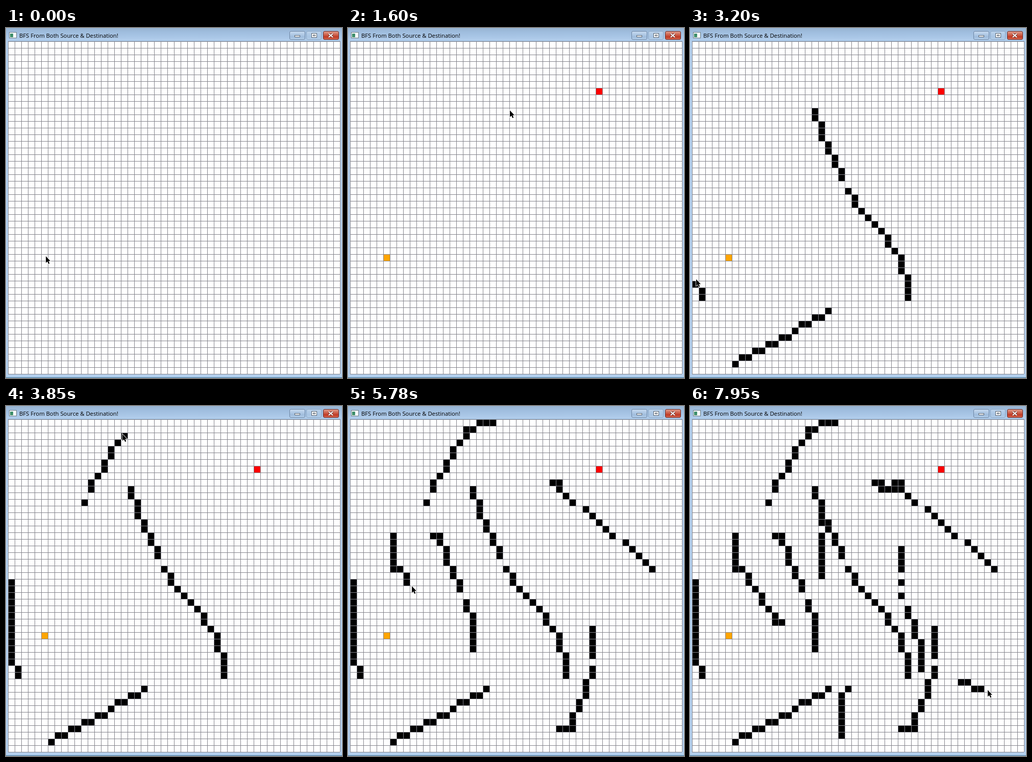
An HTML page with a canvas that plays this animation: 658x684 px, repeating every 7.99 s.

```html
<!DOCTYPE html>
<html lang="en">
<head>
<meta charset="utf-8">
<title>Grid search</title>
<style>
  html, body { margin: 0; width: 100%; height: 100%; overflow: hidden; }
  canvas { display: block; }
</style>
</head>
<body>
<canvas id="stage" width="658" height="684"></canvas>
<script>
const ctx = document.getElementById('stage').getContext('2d');
const LOOP = 7990, CELL = 13, LEFT = 4, TOP = 26, COUNT = 50;
const LIFT = null;

const path = [];   // pointer keys
const cells = [];  // wall cells with the time they turn black

const toX = col => LEFT + (col + 0.5) * CELL;
const toY = row => TOP + (row + 0.5) * CELL;

function moveTo(t, x, y) {
  path.push({ t, x, y });
}

// Walks a polyline in [col, row], one cell per step along its main direction.
function drawWall(t0, t1, ...points) {
  const steps = [];
  let last = LIFT;
  for (const point of points) {
    if (point && last) {
      const dc = point[0] - last[0], dr = point[1] - last[1];
      const w = Math.abs(dc), h = Math.abs(dr);
      const n = Math.max(1, Math.round(w > 1.5 * h ? w : h));
      for (let i = 1; i <= n; i++) steps.push([last[0] + dc * i / n, last[1] + dr * i / n]);
    } else if (point) {
      steps.push(point);
    }
    last = point;
  }
  steps.forEach(([col, row], i) => {
    const t = t0 + (t1 - t0) * i / (steps.length - 1);
    moveTo(t, toX(col), toY(row));
    cells.push({ t, col: Math.round(col), row: Math.round(row) });
  });
}

moveTo(0, 77, 446);
moveTo(740, 77, 446);
moveTo(1240, 491, 124);
moveTo(1470, 491, 124);
moveTo(1593, 316, 161);
drawWall(1690, 2400, [17.7, 10], [22, 20], LIFT, [22.7, 22], [28.65, 29], [31, 32], [32.3, 38]);
drawWall(2550, 2930, [20, 40.22], [6, 47.9]);
drawWall(3120, 3484, [1, 38], [1, 37], [0, 36], [0, 24]);
drawWall(3630, 3960, [11, 12], LIFT, [11.72, 10], [17.1, 1], [18, 1], [19, 0], [21, 0]);
drawWall(4080, 4390, [30, 9], [31, 9], [31.06, 10], [45.25, 22]);
moveTo(4545, 480, 430);
drawWall(4580, 4930, [36, 31], [36, 35], LIFT, [36.2, 37], [32.6, 46], [31, 46]);
drawWall(5080, 5470, [18, 34], [18, 29], [17.2, 28], [16.7, 27], LIFT, [16.2, 25], [12.6, 17], [12, 17]);
drawWall(5570, 5930, [6, 17], [6, 22], [7, 22], [7.8, 23], [12.2, 30], [13, 30]);
drawWall(6080, 6360, [19, 23], [19, 17], LIFT, [19, 15]);
drawWall(6540, 6700, [27, 9], [28, 9], [28, 10], [30, 10]);
moveTo(6718, 399, 169);
drawWall(6860, 7230, [31, 19], [31, 22], LIFT, [31, 24], LIFT, [31, 26], LIFT, [31.7, 28], [33.8, 33], [34, 37]);
drawWall(7390, 7640, [23, 40], [22, 41], [22, 47]);
drawWall(7820, 7920, [40, 39], [41, 39], [42, 40], [43, 40]);
moveTo(7948, 582, 555);
moveTo(LOOP, 594, 558);

function pointerAt(t) {
  const i = Math.max(1, path.findIndex(p => p.t > t));
  const a = path[i - 1], b = path[i], k = (t - a.t) / (b.t - a.t);
  return [a.x + (b.x - a.x) * k, a.y + (b.y - a.y) * k];
}

function rect(color, x, y, w, h) {
  ctx.fillStyle = color;
  ctx.fillRect(x, y, w, h);
}

function shade(x, y, w, h, ...stops) {
  const g = ctx.createLinearGradient(0, y, 0, y + h);
  stops.forEach((c, i) => g.addColorStop(i / (stops.length - 1), c));
  rect(g, x, y, w, h);
}

function button(x, w, edge, ...stops) {
  ctx.beginPath();
  ctx.roundRect(x + 0.5, 6.5, w - 1, 16, 2.5);
  ctx.save();
  ctx.clip();
  shade(x, 6, w, 17, ...stops);
  ctx.restore();
  ctx.strokeStyle = edge;
  ctx.lineWidth = 1;
  ctx.stroke();
}

function drawWindow() {
  rect('#b4d0ee', 0, 0, 658, 684);
  shade(0, 0, 658, 26, '#98b4d2', '#a0bedf', '#a9c6e6', '#b4d0ee');
  rect('#93b2d2', 3, 25, 652, 1);
  rect('#86b8dc', 0, 682, 658, 1);
  rect('#5c7c98', 0, 683, 658, 1);

  rect('#6f7f84', 6, 8, 15, 12);
  rect('#f6f9fb', 7, 9, 13, 10);
  rect('#3f8f6a', 8, 11, 6, 7);

  ctx.fillStyle = '#000';
  ctx.font = '11.25px "Open Sans", "Noto Sans", sans-serif';
  ctx.fillText('BFS From Both Source & Destination!', 26, 19);

  button(555, 31, '#6d86a4', '#c8dbf0', '#b5cde8', '#9fbcdc', '#b8d3ee');
  button(588, 30, '#8ba6c4', '#bfd5ec', '#b2cce8', '#a9c5e4', '#b6d1ec');
  button(621, 31, '#6b2a26', '#e3a596', '#d2705c', '#c03a24', '#d8705a');

  ctx.lineWidth = 1;
  ctx.strokeStyle = '#566270';
  rect('#fff', 565, 14, 11, 4);
  ctx.strokeRect(565.5, 14.5, 10, 3);
  rect('#fff', 598, 10, 11, 9);
  ctx.strokeRect(598.5, 10.5, 10, 8);
  ctx.strokeRect(601.5, 13.5, 4, 2);

  for (const [color, width] of [['#71302a', 4], ['#fff', 2.2]]) {
    ctx.strokeStyle = color;
    ctx.lineWidth = width;
    ctx.beginPath();
    ctx.moveTo(632, 11); ctx.lineTo(640, 18);
    ctx.moveTo(640, 11); ctx.lineTo(632, 18);
    ctx.stroke();
  }
}

function fillCell(color, col, row) {
  rect(color, LEFT + col * CELL, TOP + row * CELL, CELL, CELL);
}

function drawGrid() {
  const size = COUNT * CELL;
  for (let i = 0; i <= COUNT; i++) {
    rect('#84848c', LEFT + i * CELL, TOP, 1, size);
    rect('#84848c', LEFT, TOP + i * CELL, size, 1);
  }
}

const arrow = new Path2D('M0 0V13L3 10.2L5.2 15L7.4 14L5.2 9.4H9Z');

function drawPointer(x, y) {
  ctx.save();
  ctx.translate(Math.round(x) + 1, Math.round(y));
  ctx.strokeStyle = '#fff';
  ctx.lineWidth = 1.6;
  ctx.stroke(arrow);
  ctx.fillStyle = '#000';
  ctx.fill(arrow);
  ctx.restore();
}

const snap = (t, start, step) => start + Math.floor((t - start) / step) * step;

function draw(time) {
  const t = time < 1470 ? Math.max(0, snap(time, 740, 44)) : snap(time, 2290, 41);
  drawWindow();
  rect('#fff', LEFT, TOP, COUNT * CELL, COUNT * CELL);
  if (time >= 490) fillCell('#ffa500', 5, 32);
  if (time >= 1270) fillCell('#ff0000', 37, 7);
  for (const c of cells) if (c.t <= t) fillCell('#000', c.col, c.row);
  drawGrid();
  drawPointer(...pointerAt(t));
}

const start = performance.now();
function frame() {
  draw((performance.now() - start) % LOOP);
  requestAnimationFrame(frame);
}
frame();
</script>
</body>
</html>
```
